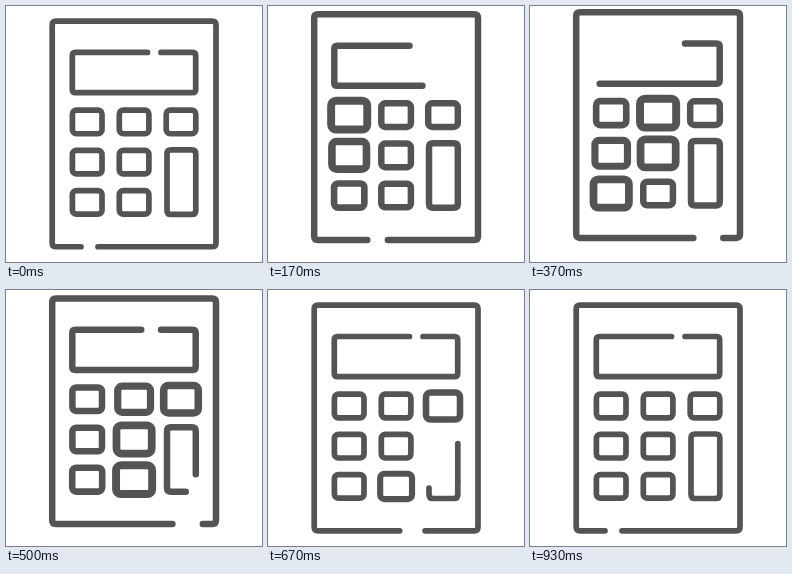
Write an HTML page that moves like this. It is 256x256 px and loops after 1.53 s.

```html
<!DOCTYPE html>
<html lang="en">
<head>
<meta charset="utf-8">
<title>Calculator icon</title>
<style>
html, body { margin: 0; width: 100%; height: 100%; overflow: hidden; background: #fff; }
svg { display: block; width: 100vw; height: 100vh; }
</style>
</head>
<body>
<svg viewBox="0 0 256 256">
  <g id="calc" fill="none" stroke="#545454" stroke-linecap="round" stroke-linejoin="round"></g>
</svg>
<script>
const LOOP = 1530;
const calc = document.getElementById('calc');

function add(tag, attrs = {}) {
  const el = document.createElementNS('http://www.w3.org/2000/svg', tag);
  for (const k in attrs) el.setAttribute(k, attrs[k]);
  return calc.appendChild(el);
}

const clamp = v => Math.min(1, Math.max(0, v));
const smooth = u => u * u * (3 - 2 * u);
const ease = (t, start, dur) => smooth(clamp((t - start) / dur));

// Cubic bezier easing with y handles at 0 and 1.
function bezier(u, x1, x2) {
  let lo = 0, hi = 1;
  for (let i = 0; i < 24; i++) {
    const s = (lo + hi) / 2, r = 1 - s;
    const x = 3 * s * r * r * x1 + 3 * s * s * r * x2 + s * s * s;
    if (x < u) lo = s; else hi = s;
  }
  return smooth(lo);
}

const body = add('path');

// An outline that is wiped away from its start and then drawn again.
function wiper(d, start) {
  const parts = [add('path', { d }), add('path', { d })];
  const len = parts[0].getTotalLength();
  const show = (el, a, b) => {
    el.style.display = b > a ? '' : 'none';
    el.setAttribute('stroke-dasharray', `${b - a} ${len * 2}`);
    el.setAttribute('stroke-dashoffset', -a);
  };
  return t => {
    const gone = ease(t, start, 365);
    const back = ease(t, start + 115, 395);
    show(parts[0], 0, back < 0.03 ? 0 : back * len);
    show(parts[1], gone * len, gone < 0.985 ? len : 0);
  };
}

const wipers = [
  wiper('M155 46.5H186.5Q189.7 46.5 189.7 49.7V83.5Q189.7 86.7 186.5 86.7H69.5Q66.3 86.7 66.3 83.5V49.7Q66.3 46.5 69.5 46.5H141.5', 26),
  wiper('M189.8 191V204.5Q189.8 208.5 185.8 208.5H165Q161 208.5 161 204.5V148Q161 144 165 144H185.8Q189.8 144 189.8 148V191', 414)
];

// Column, row and start time of each key's pulse.
const keys = [
  [0, 0, 20], [0, 1, 80], [0, 2, 145],
  [1, 0, 215], [1, 1, 270], [1, 2, 365], [2, 0, 410]
].map(([col, row, start]) => ({
  x: 81.2 + 46.9 * col,
  y: 116 + 40.2 * row,
  start,
  el: add('rect', { x: -14.8, y: -11.8, width: 29.6, height: 23.6, rx: 4 })
}));

const pulse = (t, start) => 1 + 0.22 * (ease(t, start, 133) - ease(t, start + 185, 200));

function draw(t) {
  const lift = 9 * Math.max(0, 1 - (t / 333.5 - 1) ** 2);
  calc.setAttribute('transform', `translate(0 ${-lift})`);
  // Lines grow slightly heavier while the calculator is lifted.
  calc.setAttribute('stroke-width', 5.7 + 0.8 * clamp(lift / 4));

  const slide = t < 470 ? bezier(clamp(t / 467), 0.57, 0.33) : 1 - ease(t, 480, 453);
  const left = 75 + 92 * slide, right = 92 + 105.5 * slide;
  body.setAttribute('d', `M${right} 240.8H206.2Q210 240.8 210 237V19Q210 15.2 206.2 15.2H50Q46.2 15.2 46.2 19V237Q46.2 240.8 50 240.8H${left}`);

  wipers.forEach(w => w(t));
  keys.forEach(k => k.el.setAttribute('transform', `translate(${k.x} ${k.y}) scale(${pulse(t, k.start)})`));
}

const begin = performance.now();
function tick() {
  draw((performance.now() - begin) % LOOP);
  requestAnimationFrame(tick);
}
tick();
</script>
</body>
</html>
```
